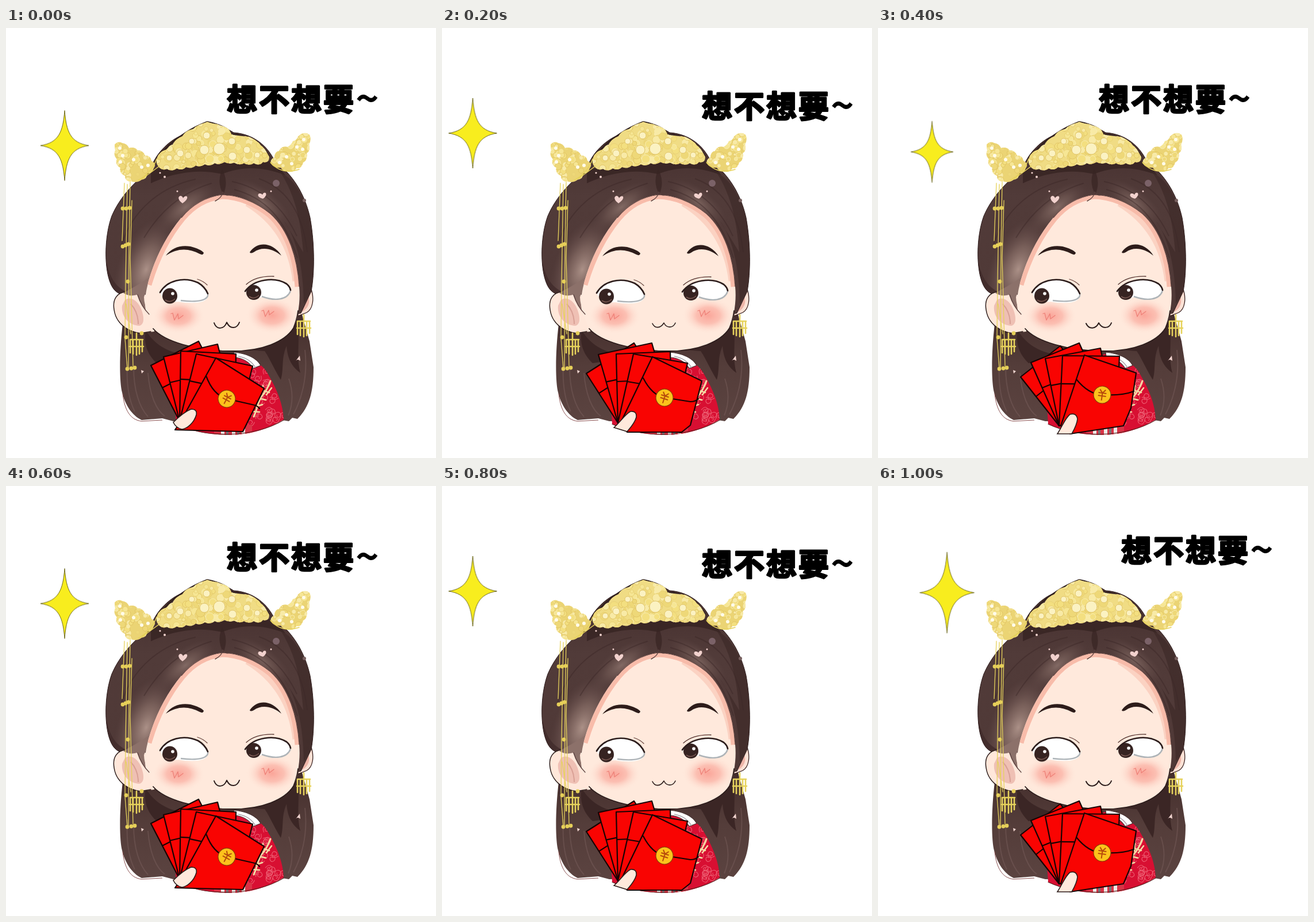
These frames come from a looping animation (748x748 px, 1200 ms). An HTML page:

```html
<!DOCTYPE html>
<html lang="zh">
<head>
<meta charset="utf-8">
<title>想不想要</title>
<style>
  html, body { margin: 0; width: 100%; height: 100%; overflow: hidden; background: #fff; }
  svg { display: block; width: 100vw; height: 100vh; }
  .line { fill: none; stroke: #2c1d1c; stroke-width: 2; stroke-linecap: round; stroke-linejoin: round; }
  .gold { fill: none; stroke: #e6d25c; stroke-linecap: round; stroke-linejoin: round; }
  .card { fill: #f90402; stroke: #170303; stroke-width: 2.2; stroke-linejoin: round; }
  .words { font: 900 53px "Noto Sans CJK SC", "Noto Sans CJK", sans-serif; letter-spacing: 3px; stroke: #000; stroke-width: 3; stroke-linejoin: round; }
  .tilde { font-size: 69px; font-weight: 700; stroke-width: 0; }

  .pose { animation: pose 600ms step-end infinite; }
  .b { animation-delay: -400ms; }
  .c { animation-delay: -200ms; }
  @keyframes pose {
    0% { visibility: visible; }
    33.333%, 100% { visibility: hidden; }
  }
  .words { animation: words 1200ms step-end infinite; }
  @keyframes words {
    0%, 33.333%, 50%, 100% { transform: translate(0, 0); }
    16.666%, 66.666% { transform: translate(68px, 12px); }
    83.333% { transform: translate(39px, -12px); }
  }
  .star { animation: star 1200ms step-end infinite; }
  @keyframes star {
    0%, 50%, 100% { transform: translate(102px, 204.5px); }
    16.666%, 66.666% { transform: translate(53.5px, 183px); }
    33.333% { transform: translate(94px, 215.5px) scale(.875); }
    83.333% { transform: translate(120px, 185.5px) scale(1.13, 1.155); }
  }
  .look { animation: look 600ms step-end infinite; }
  @keyframes look {
    0%, 66.666%, 100% { transform: translate(0, 0); }
    33.333% { transform: translate(var(--dx), 1px); }
  }
</style>
</head>
<body>
<svg viewBox="0 0 748 748">
  <defs>
    <linearGradient id="hair" x1="0" y1="0" x2="0" y2="1">
      <stop offset="0" stop-color="#432d2c"/><stop offset=".35" stop-color="#513b39"/>
      <stop offset="1" stop-color="#4f3836"/>
    </linearGradient>
    <linearGradient id="back" x1="0" y1="0" x2="0" y2="1">
      <stop offset="0" stop-color="#432d2b"/><stop offset=".5" stop-color="#543d3a"/>
      <stop offset="1" stop-color="#5b4340"/>
    </linearGradient>
    <radialGradient id="sheen">
      <stop offset="0" stop-color="#b59a90" stop-opacity=".9"/>
      <stop offset=".45" stop-color="#937870" stop-opacity=".6"/>
      <stop offset="1" stop-color="#6b5250" stop-opacity="0"/>
    </radialGradient>
    <radialGradient id="blush">
      <stop offset="0" stop-color="#faa599"/><stop offset=".45" stop-color="#fbb5a8" stop-opacity=".8"/>
      <stop offset="1" stop-color="#ffe9dc" stop-opacity="0"/>
    </radialGradient>
    <path id="headShape" d="M183 447C170 420 171 362 184 327C198 294 224 267 252 245C258 222 281 197 305 187C335 167 371 165 396 182C428 184 455 203 468 233C498 253 520 289 529 330C537 375 537 425 531 458L513 496L400 520L262 480L215 465C200 466 189 460 183 447Z"/>
    <path id="faceShape" d="M376 290C346 294 324 307 305 330C277 364 259 402 248 440C243 461 238 480 246 500L256 523C275 545 330 562 395 562C445 562 485 546 500 522C506 507 513 480 510 450C507 400 492 352 460 323C432 301 405 291 376 290Z"/>
    <path id="tiaraShape" d="M262 236C261 226 265 217 275 213C282 212 283 204 290 203C294 194 301 191 307 188C312 179 320 177 326 176C332 168 342 167 350 163C359 167 367 166 374 170C382 172 390 176 392 185C401 188 413 187 424 190C432 194 439 198 443 204C451 210 454 217 458 224Q458 236 447 233Q441 241 431 235Q423 241 414 235Q406 240 397 234Q389 238 380 233Q371 239 363 235Q355 242 346 237Q337 243 330 239Q323 246 313 242Q306 249 297 244Q288 251 280 245Q269 250 262 236Z"/>
    <path id="leftShape" d="M189 203Q195 196 202 200Q211 201 214 209Q224 206 229 213Q239 213 242 222Q252 222 253 231Q263 236 257 244Q255 252 246 253Q245 263 236 264Q228 270 219 267Q207 267 207 257Q197 253 199 243Q189 238 193 228Q186 221 190 213Z"/>
    <path id="rightShape" d="M528 186Q532 194 527 203Q530 213 523 218Q525 230 517 234Q514 245 505 244Q499 253 491 249Q482 250 478 243Q466 244 461 236Q459 229 467 225Q467 215 475 214Q480 204 490 207Q497 203 499 197Q505 196 508 189Q519 178 528 186Z"/>
    <clipPath id="headClip"><use href="#headShape"/></clipPath>
    <clipPath id="faceClip"><use href="#faceShape"/></clipPath>
    <clipPath id="tiaraClip"><use href="#tiaraShape"/></clipPath>
    <clipPath id="leftClip"><use href="#leftShape"/></clipPath>
    <clipPath id="rightClip"><use href="#rightShape"/></clipPath>
    <clipPath id="robeClip"><path id="robeShape" d="M398 566C428 572 448 585 458 606C472 630 482 655 483 681C451 701 419 708 385 708C348 707 318 700 296 689L290 600Z"/></clipPath>
  </defs>

  <!-- back hair -->
  <path d="M203 515C197 565 197 615 202 634C207 655 219 674 236 682L272 679L291 684L480 682L492 684L498 678L507 680C527 660 535 635 535 590L528 545L514 495L380 500Z" fill="url(#back)"/>
  <path d="M203 636C206 664 216 682 236 684L272 682" fill="none" stroke="#8a4f4f" stroke-width="1"/>
  <path d="M243 525C262 560 300 570 340 572L262 583C248 570 238 550 243 525ZM420 560C460 550 496 530 508 505C511 550 505 575 512 600C496 588 490 575 488 553C478 577 484 592 478 612C466 592 456 570 450 562Z" fill="#3b2625"/>
  <g fill="none" stroke="#7a605d" stroke-width="2" opacity=".45">
    <path d="M222 590C222 630 232 660 247 676M247 600C250 640 262 665 276 675M520 560C526 610 512 650 500 672M492 610C502 640 497 660 491 674M211 580C209 620 214 648 224 667"/>
  </g>
  <path d="M504 579L511 570L512 579Q507 575 504 579ZM235 595l5 2l-4 4Z" fill="#f3d5d0"/>

  <!-- robe -->
  <use href="#robeShape" fill="#d80f32"/>
  <g id="swirls" clip-path="url(#robeClip)" fill="none" stroke="#ec5c70" stroke-width="1.1"></g>
  <g clip-path="url(#robeClip)">
    <path d="M362 690H428V710H362Z" fill="#d93346"/>
    <path d="M377 690v20M396 690v20M413 690v20" stroke="#eeeae6" stroke-width="6"/>
    <path d="M385 690v20M404 690v20" stroke="#777478" stroke-width="4"/>
  </g>
  <path d="M396 564C420 566 437 575 443 587L430 592C423 581 412 574 397 573Z" fill="#fff" stroke="#47302f" stroke-width="1.2"/>
  <path d="M404 571C420 574 429 582 434 591" fill="none" stroke="#a9a5aa" stroke-width="1.5"/>
  <g fill="none" stroke="#f4d9a4" stroke-linecap="round">
    <path d="M460 614C456 626 450 635 443 643C437 655 436 666 431 676" stroke-width="3"/>
    <path d="M444 630l14 4M447 622l-1 13M462 626l-9 12M452 647l-16 -4M446 655l-15 5M441 668l-11 -1" stroke-width="2.6"/>
  </g>
  <path d="M296 689C350 714 430 713 483 682" class="line" style="stroke:#5d2020;stroke-width:1.2"/>

  <!-- ears -->
  <path d="M530 452C537 470 534 489 523 495L508 501L508 460Z" fill="#fde2d6" stroke="#38211f" stroke-width="1.3"/>
  <path d="M525 465C530 475 527 488 514 494Q514 478 525 465Z" fill="#edb5a8"/>

  <!-- head -->
  <use href="#headShape" fill="url(#hair)" stroke="#2c1b1b" stroke-width="1"/>
  <g clip-path="url(#headClip)">
    <ellipse cx="244" cy="420" rx="50" ry="92" fill="url(#sheen)" transform="rotate(20 244 420)"/>
    <ellipse cx="312" cy="312" rx="62" ry="28" fill="url(#sheen)" opacity=".55" transform="rotate(-38 312 312)"/>
    <ellipse cx="446" cy="304" rx="60" ry="24" fill="url(#sheen)" opacity=".45" transform="rotate(38 446 304)"/>
    <path d="M252 248C300 232 430 224 468 234L486 256C440 239 408 242 376 254C330 244 292 252 252 270Z" fill="#352221" opacity=".75"/>
    <path d="M376 246Q366 268 378 290Q388 266 376 246Z" fill="#382423" opacity=".7"/>
    <g fill="none" stroke="#382423" stroke-width="2" opacity=".4">
      <path d="M358 270C310 284 270 315 240 365M330 263C270 276 220 315 200 380M393 267C440 277 480 307 506 362M397 281C450 295 484 330 507 400M440 262C490 280 517 325 524 390"/>
    </g>
    <path d="M482 333C506 366 517 416 518 480L536 450L535 350C520 290 500 262 478 252C502 290 512 330 517 390Z" fill="#3d2827" opacity=".65"/>
    <path d="M174 400C178 430 190 452 211 459L196 476L170 460Z" fill="#3e2928" opacity=".7"/>
  </g>
  <path d="M209 459C193 460 185 472 188 490C191 512 209 528 234 531L258 528L262 470L232 461Z" fill="#ffe7da"/>
  <path d="M209 459C193 460 185 472 188 490C191 512 209 528 234 531L252 528" class="line" style="stroke-width:1.5"/>
  <path d="M207 473C219 465 231 477 236 491C241 505 240 516 232 518C213 517 200 502 202 483Z" fill="#efc0b4"/>
  <path d="M217 480Q230 494 230 515" fill="none" stroke="#d9a095" stroke-width="2"/>
  <path d="M204 461C218 453 232 446 252 432L240 468Q240 482 249 498Q235 485 228 464Q215 468 204 461Z" fill="#8c716a"/>
  <use href="#faceShape" fill="#ffe9dc"/>
  <path d="M229 464Q235 484 249 498" class="line" style="stroke:#5b4240;stroke-width:1.3"/>
  <g clip-path="url(#faceClip)" fill="none" stroke="#f8bcaa">
    <path d="M246 446C259 402 277 364 305 330C324 307 346 294 376 290C405 291 432 301 460 323C492 352 507 400 510 450" stroke-width="15"/>
    <path d="M420 304C470 334 498 380 505 440" stroke-width="13" opacity=".5"/>
  </g>
  <path d="M376 290C346 294 324 307 305 330M376 290C405 291 432 301 460 323C492 352 507 400 510 450" fill="none" stroke="#604542" stroke-width="1.2"/>
  <path d="M256 523C275 545 330 562 395 562C445 562 485 546 500 522C504 512 507 500 508 492" class="line" style="stroke-width:1.8"/>
  <path d="M364 301Q376 295 377 285Q382 295 395 288" class="line" style="stroke:#573f3d;stroke-width:1.4"/>

  <g fill="#f2d2ce">
    <path d="M307 305C300 300 298 294 303 292Q307 292 308 296Q311 291 315 293Q317 298 307 305Z"/>
    <path d="M447 297C438 295 437 290 440 288Q444 287 446 290Q448 285 452 287Q454 292 447 297Z"/>
    <circle cx="276" cy="259" r="2"/><circle cx="268" cy="252" r="1.6"/><circle cx="298" cy="284" r="1.5"/><circle cx="461" cy="284" r="1.5"/>
  </g>
  <circle cx="470" cy="270" r="6" fill="#7b6268"/><circle cx="519" cy="300" r="3" fill="#77605f"/>

  <!-- features -->
  <ellipse cx="300" cy="501" rx="46" ry="31" fill="url(#blush)"/>
  <ellipse cx="463" cy="500" rx="46" ry="32" fill="url(#blush)"/>
  <g fill="none" stroke="#ee8178" stroke-width="1.3" stroke-linecap="round" stroke-linejoin="round">
    <path d="M287 497l3 -1l3 12l6 -11l1 9l8 -6"/><path d="M445 492l3 -1l3 11l6 -11l1 8l8 -6"/>
  </g>
  <g class="look" style="--dx:1px">
    <path d="M278 396C288 382 304 377 321 380C333 383 341 387 344 391Q343 396 337 393C318 383 299 382 278 396Z" fill="#2d1c1a"/>
    <path d="M268 460C281 439 313 432 337 446C348 454 353 464 350 470C344 479 322 480 300 476Q276 478 268 460Z" fill="#fff"/>
    <path d="M351 462C353 473 336 478 304 474" fill="none" stroke="#aeb4b8" stroke-width="2.4"/>
    <ellipse cx="285" cy="466" rx="13" ry="13.5" fill="#362321"/>
    <path d="M277 473Q285 479 294 471" fill="none" stroke="#775650" stroke-width="1.6"/>
    <circle cx="290" cy="462" r="2.8" fill="#fff"/>
    <path d="M268 460C280 439 309 432 334 443Q346 450 351 462" class="line" style="stroke-width:2.7"/>
    <path d="M333 437Q343 440 350 447" class="line" style="stroke:#6b4842;stroke-width:1.3"/>
  </g>
  <g class="look" style="--dx:2px">
    <path d="M424 390C434 375 451 373 464 381Q474 387 479 396C463 383 445 380 431 390Q425 393 424 390Z" fill="#2d1c1a"/>
    <path d="M416 458C432 436 469 432 490 447Q498 456 493 462C486 474 463 474 446 468Q428 473 416 458Z" fill="#fff"/>
    <path d="M495 457C489 474 467 475 445 467" fill="none" stroke="#aeb4b8" stroke-width="2.4"/>
    <ellipse cx="431" cy="460" rx="13" ry="13" fill="#362321"/>
    <path d="M423 467Q431 473 440 465" fill="none" stroke="#775650" stroke-width="1.6"/>
    <circle cx="436" cy="456" r="2.8" fill="#fff"/>
    <path d="M416 458C431 437 467 432 488 445Q494 450 495 456" class="line" style="stroke-width:2.7"/>
    <path d="M418 446Q435 431 466 432" class="line" style="stroke:#50302c;stroke-width:1.3"/>
  </g>
  <path class="pose a line" d="M362 513C366 525 379 525 384 512C390 525 402 523 406 512"/>
  <path class="pose b line" d="M366 514C370 523 380 523 386 513C391 523 402 522 406 513" style="stroke-width:1.6"/>
  <path class="pose c line" d="M362 514C367 525 379 524 384 513C390 524 402 523 406 513"/>

  <!-- jewels -->
  <path d="M262 236C261 226 265 217 275 213C295 190 326 172 350 163C370 167 390 175 392 185C420 186 448 202 458 224" class="line"/>
  <use href="#tiaraShape" fill="#f0dc84"/><g id="tiara" clip-path="url(#tiaraClip)"></g>
  <use href="#leftShape" fill="#ebd474"/><g id="left" clip-path="url(#leftClip)"></g>
  <use href="#rightShape" fill="#ebd474"/><g id="right" clip-path="url(#rightClip)"></g>
  <path class="gold" stroke-width="1.5" d="M262 228Q254 251 230 265M267 240Q250 253 237 262M460 234Q480 256 510 246"/>
  <g class="gold" stroke-width="1.3">
    <path d="M206 270L202 370M211 272L208 440L207 535M216 268L214 380L213 590M219 300L216 400L221 588M207 540L211 592M209 480L217 532"/>
  </g>
  <g id="beads" fill="#e6cf59"></g>
  <path id="drop" class="gold" stroke-width="2.6" d="M227 531V540M216 542H238M216 542V565M221 542V567M227 540V569M232 542V567M237 542V563M215 554H239"/>
  <use href="#drop" transform="translate(291 -32)"/>

  <g id="cards"></g>

  <g class="star">
    <path d="M0 -61C3 -24 10 -5 42 0C10 5 3 24 0 61C-3 24 -10 5 -42 0C-10 -5 -3 -24 0 -61Z" fill="#f8ed1e" stroke="#6d6820" stroke-width="1" vector-effect="non-scaling-stroke"/>
  </g>
  <g class="words">
    <text x="384" y="143.5">想不想要</text>
    <text class="tilde" x="608" y="148">~</text>
  </g>
</svg>
<script>
  const $ = id => document.getElementById(id);
  let seed = 11;
  const rnd = () => (seed = seed * 16807 % 2147483647) / 2147483647;
  const pick = list => list[Math.floor(rnd() * list.length)];
  const dot = (x, y, r, fill, ring = 'none') =>
    `<circle cx="${x}" cy="${y}" r="${r}" fill="${fill}" stroke="${ring}"/>`;

  function jewels(id, x, y, w, h, n, max) {
    let out = '';
    for (let i = 0; i < n; i++) {
      out += dot(x + rnd() * w, y + rnd() * h, 2 + rnd() * max,
        pick(['#f6e694', '#f3df80', '#f8eaa6', '#eed878']), pick(['#e0c464', '#e8d074', '#f8ecb0']));
    }
    $(id).innerHTML = out;
  }
  jewels('tiara', 260, 162, 200, 88, 200, 6);
  jewels('left', 188, 196, 74, 74, 65, 4);
  jewels('right', 458, 180, 74, 72, 65, 4);
  const pearls = [[371, 210, 10], [394, 223, 7], [393, 197, 6], [349, 187, 6], [345, 212, 8], [419, 212, 6], [323, 197, 5], [303, 218, 6], [284, 226, 5], [437, 221, 5]];
  $('tiara').innerHTML += pearls.map(([x, y, r]) => dot(x, y, r, '#fbf2c2', '#e0c46a')).join('');
  $('left').innerHTML += [[198, 209], [203, 222], [199, 233], [236, 242], [247, 239], [222, 229]].map(p => dot(...p, 3, '#fffbea')).join('');
  $('right').innerHTML += [[518, 194], [506, 207], [516, 211], [488, 224], [476, 234], [497, 236]].map(p => dot(...p, 3, '#fffbea')).join('');

  $('beads').innerHTML = [[203, 314], [209, 314], [215, 313], [203, 380], [208, 378], [213, 376], [212, 441], [209, 538], [236, 531], [211, 593], [218, 592], [224, 591]]
    .map(p => dot(...p, 3.4)).join('');

  let spots = '';
  for (let i = 0; i < 38; i++) {
    const x = 405 + rnd() * 78, y = 588 + rnd() * 112;
    spots += `<path d="M${x} ${y}q8 -9 12 0q0 8 -7 5q-4 -5 2 -6" transform="rotate(${rnd() * 360} ${x} ${y})"/>`;
  }
  $('swirls').innerHTML = spots;

  // tops: left and right upper corners of each envelope, back to front
  const poses = [
    { name: 'a', pivot: [302, 684],
      tops: [[252, 587, 335, 545], [274, 572, 368, 550], [304, 562, 400, 567], [331, 567, 429, 588]],
      front: 'M365 574L449 627L412 702L294 699L304 684Z',
      flap: 'M348 605Q360 638 384 645L428 655Q438 657 441 662',
      coin: [384, 645, 28],
      thumb: 'M291 686C300 677 312 667 322 663Q333 663 331 673C327 687 315 697 306 698Q296 696 291 686Z' },
    { name: 'b', pivot: [306, 687],
      tops: [[251, 601, 334, 548], [272, 568, 365, 548], [303, 567, 397, 563], [333, 567, 427, 583]],
      front: 'M366 572L452 614L432 691L417 703L322 703L311 686Z',
      flap: 'M350 609Q366 640 388 643L432 650Q441 650 446 645',
      coin: [387, 643, 18],
      thumb: 'M299 695C309 687 318 672 328 667Q339 666 338 677C335 688 327 696 322 702Z' },
    { name: 'c', pivot: [315, 692],
      tops: [[248, 607, 317, 553], [266, 582, 350, 548], [291, 575, 387, 557], [321, 570, 420, 571]],
      front: 'M359 569L449 600L440 661L427 692L334 706L318 692Z',
      flap: 'M345 611Q366 637 390 638Q424 640 445 632',
      coin: [390, 638, 8],
      thumb: 'M312 706C320 694 326 678 334 672Q345 669 347 680C346 690 341 699 337 706Z' }
  ];

  function envelope([lx, ly, rx, ry], [px, py]) {
    const at = (x, y, t) => `${x + (px - lx) * t} ${y + (py - ly) * t}`;
    return `<path class="card" d="M${lx} ${ly}L${rx} ${ry}L${at(rx, ry, .78)}L${px} ${py}Z"/>
      <path class="card" d="M${at(lx, ly, .4)}L${at(rx, ry, .4)}"/>`;
  }

  $('cards').innerHTML = poses.map(p => `<g class="pose ${p.name}">
    ${p.tops.map(t => envelope(t, p.pivot)).join('')}
    <path class="card" d="${p.front}"/>
    <path class="line" d="${p.flap}" style="stroke:#170303;stroke-width:2.2"/>
    <g transform="translate(${p.coin[0]} ${p.coin[1]}) rotate(${p.coin[2]})">
      <circle r="15" fill="#fdc21c" stroke="#8a3d08" stroke-width="1.2"/>
      <path d="M-5 -9L0 -3L5 -9M-7 -3H7M-7 2H7M0 -3V10" fill="none" stroke="#b64a0c" stroke-width="2"/>
    </g>
    <path d="${p.thumb}" fill="#ffe9dc" stroke="#2c1d1c" stroke-width="1.6"/>
  </g>`).join('');
</script>
</body>
</html>
```
